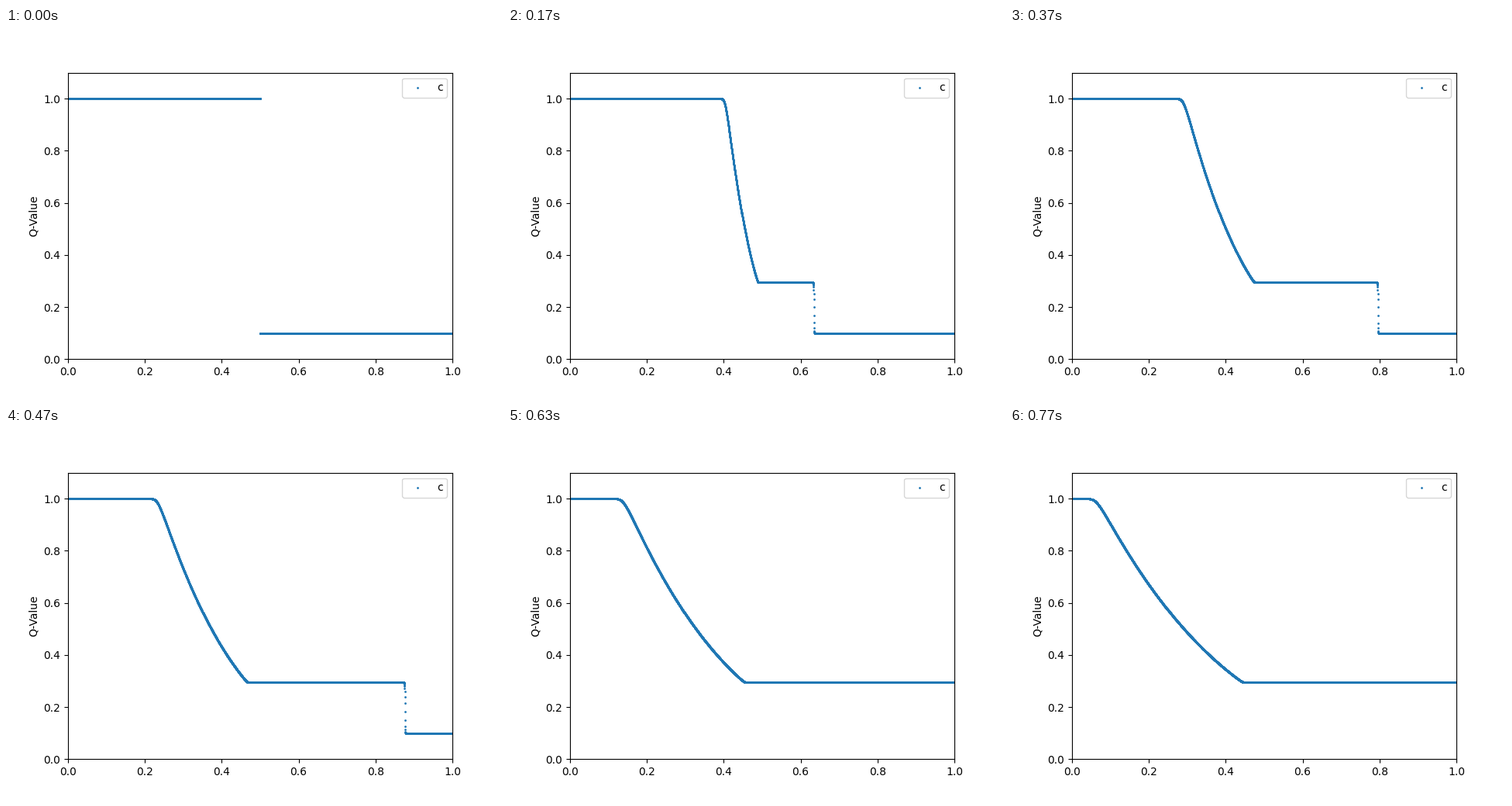
A matplotlib script for the animation above (0.8 s loop, 640 by 480 pixels).

```python
import math

import matplotlib.pyplot as plt
import numpy as np
from matplotlib.animation import FuncAnimation

# Shock tube: pressure of an ideal monatomic gas, smeared like an upwind scheme.
LOOP_MS, TICK_MS = 800, 10
STATES = 24
DT = 0.35 / STATES
CELLS = 5000
DX = 1 / CELLS
GAMMA = 5 / 3
P_LEFT, P_RIGHT, RHO_RIGHT = 1.0, 0.1, 0.125
P_STAR = 0.29394                      # pressure between the two waves

C_LEFT = math.sqrt(GAMMA * P_LEFT)
C_RIGHT = math.sqrt(GAMMA * P_RIGHT / RHO_RIGHT)
HEAD = -C_LEFT
TAIL = C_LEFT * (3 - 4 * P_STAR ** 0.2)
SHOCK = C_RIGHT * math.sqrt(0.8 * P_STAR / P_RIGHT + 0.2)

x = (np.arange(CELLS) + 0.5) * DX
erfc = np.vectorize(math.erfc)


def soft_ramp(z):
    """Viscous corner: 0 for z << 0, z for z >> 0."""
    zc = np.clip(z, -30, 20)
    ramp = math.sqrt(2 / math.pi) * np.exp(-zc ** 2 / 2) / erfc(zc / math.sqrt(2))
    return np.where(z > 20, z, ramp)


def smear(speed, t):
    return math.sqrt(0.94 * abs(speed) * DX * t)


def pressure(t):
    if t == 0:
        return np.where(x < 0.5, P_LEFT, P_RIGHT)
    head, tail = 0.5 + HEAD * t, 0.5 + TAIL * t
    sh, st = smear(HEAD, t), smear(TAIL, t)
    wave = np.where(x < (head + tail) / 2,
                    HEAD + sh / t * soft_ramp((x - head) / sh),
                    TAIL - st / t * soft_ramp((tail - x) / st))
    fan = P_LEFT * (0.75 - 0.25 * wave / C_LEFT) ** 5

    # The shock front is steeper ahead than behind.
    s = np.clip((x - 0.5 - SHOCK * t) / DX - 0.15, -60, 60)
    front = 1 / (1 + np.exp(0.67 * s + 0.6 * np.log(np.cosh(s / 3))))
    return P_RIGHT + (fan - P_RIGHT) * front


curves = [np.column_stack([x, pressure(k * DT)]) for k in range(STATES)]

fig, ax = plt.subplots(figsize=(6.4, 4.8), dpi=100)
dots = ax.scatter(x, curves[0][:, 1], s=1, label="c")
ax.set_xlim(0, 1)
ax.set_ylim(0, 1.1)
ax.set_ylabel("Q-Value")
ax.legend(loc="upper right")


def update(tick):
    state = int((tick + 0.5) * TICK_MS * STATES / LOOP_MS)
    dots.set_offsets(curves[state])
    return [dots]


anim = FuncAnimation(fig, update, frames=LOOP_MS // TICK_MS, interval=TICK_MS,
                     repeat=True, repeat_delay=0)
plt.show()
```
